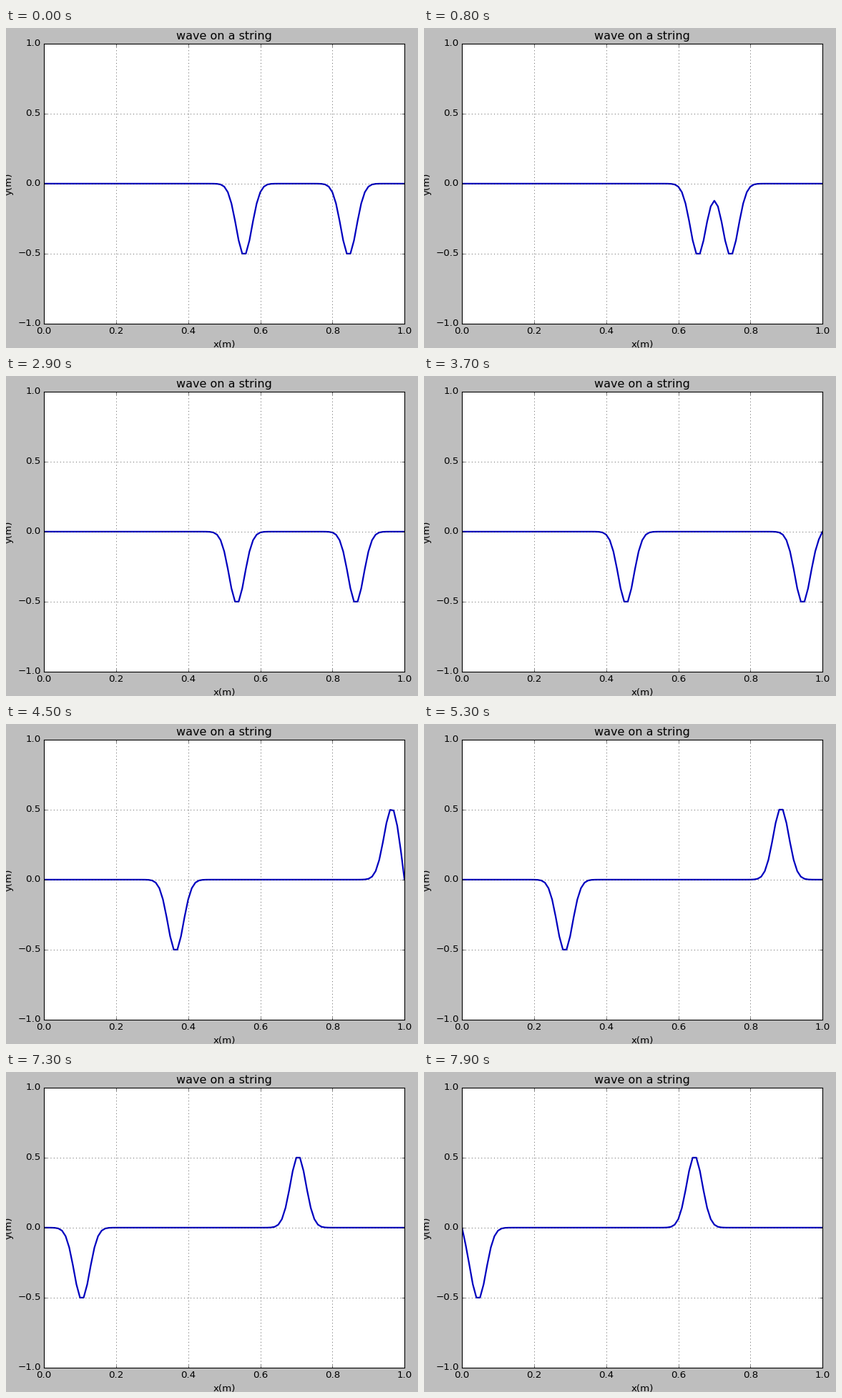
These frames come from a looping animation (576 by 448 pixels, 8 s). A matplotlib script:

```python
import numpy as np
import matplotlib.pyplot as plt
from matplotlib.animation import FuncAnimation

W, H, DPI = 576, 448, 80
FRAMES, INTERVAL = 80, 100

plt.style.use("classic")
plt.rcParams.update({
    "font.family": "DejaVu Sans",
    "font.size": 12,
    "savefig.dpi": "figure",
    "savefig.facecolor": "auto",
    "figure.facecolor": "0.745",
})

# The string advances one cell per tick, apart from a few stalls and skips.
advance = np.ones(FRAMES, dtype=int)
advance[[0, 14, 19, 44, 62, 66, 71]] = 0
advance[[3, 6, 15, 29, 41, 45, 63]] = 2
steps = np.cumsum(advance)

DX = 0.01
x = np.linspace(0, 1, 101)


def pulse(center):
    return 0.5 * np.exp(-((x - center) ** 2 - 0.005 ** 2) / 0.00095)


def string(step):
    """Two dips passing through each other, inverted at the fixed ends."""
    right = 0.555 + DX * step
    left = 0.845 - DX * step
    y = pulse(2 - right) + pulse(-left) - pulse(right) - pulse(left)
    y[[0, -1]] = 0
    return y


fig = plt.figure(figsize=(W / DPI, H / DPI), dpi=DPI)
ax = fig.add_axes([53.1 / W, 34.1 / H, 504 / W, 392 / H])
ax.set_xlim(0, 1)
ax.set_ylim(-1, 1)
ax.set_xticks(np.linspace(0, 1, 6))
ax.set_yticks(np.linspace(-1, 1, 5))
ax.grid(True)
ax.set_title("wave on a string")
ax.set_xlabel("x(m)")
ax.set_ylabel("y(m)")
line, = ax.plot(x, string(0), color="#0000bf", lw=2)


def update(i):
    line.set_ydata(string(steps[i % FRAMES]))
    return line,


anim = FuncAnimation(fig, update, frames=FRAMES, interval=INTERVAL,
                     repeat=True, repeat_delay=0)
plt.show()
```
